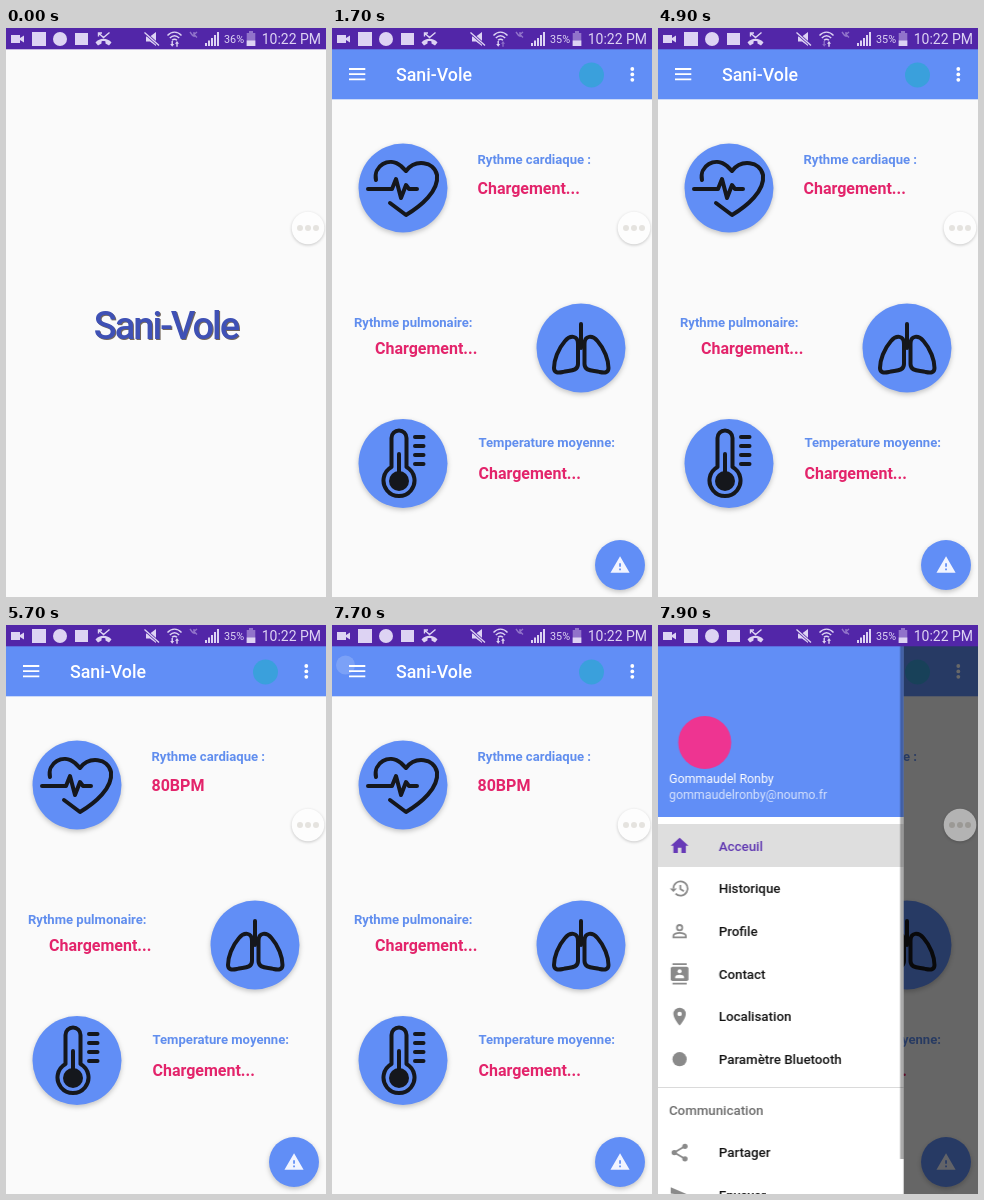
These frames come from a looping animation (320x569 px, 8000 ms). An HTML page:

```html
<!DOCTYPE html>
<html lang="fr">
<head>
<meta charset="utf-8">
<title>Sani-Vole</title>
<style>
  html, body { margin: 0; width: 100%; height: 100%; overflow: hidden; background: #fafafa; }
  svg { display: block; width: 100%; height: 100%; font-family: Roboto, sans-serif; }

  .status { fill: #ddd3f3; }
  .line { fill: none; stroke: #ddd3f3; stroke-width: 1.4; }
  .disc { fill: #618ef6; filter: drop-shadow(0 2px 2.5px rgba(0, 0, 0, .22)); }
  .ink { fill: none; stroke: #15171c; stroke-width: 4; stroke-linecap: round; stroke-linejoin: round; }
  .label { font-size: 13.1px; font-weight: 700; fill: #618eee; }
  .value { font-size: 16px; font-weight: 700; fill: #e3246b; }
  .brand { font-size: 17.8px; font-weight: 500; fill: #fff; }
  .logo { font-size: 38px; font-weight: 500; letter-spacing: -2px; fill: #3f51b5; text-anchor: middle;
          filter: drop-shadow(1px 1px .6px rgba(70, 55, 40, .75)); }
  .menu { font-size: 13.3px; font-weight: 500; fill: #111; }
  .icons { fill: #8a8a8a; }
  .outline { fill: none; stroke: #8a8a8a; stroke-width: 2; }

  .splash, .home, .old, .new, .up, .down, .wait, .bpm, .touch, .scrim, .drawer {
    animation: 8s step-end infinite;
  }
  .splash { animation-name: splash; }
  .home   { animation-name: home; }
  .old    { animation-name: old; }
  .new    { animation-name: new; }
  .up     { animation-name: up; }
  .down   { animation-name: down; }
  .wait   { animation-name: wait; }
  .bpm    { animation-name: bpm; }
  .touch  { animation-name: touch; }
  .scrim  { animation-name: scrim; }
  .drawer { animation-name: drawer; }

  @keyframes splash { 0% { opacity: 1 } 12.5%, 100% { opacity: 0 } }
  @keyframes home   { 0% { opacity: 0 } 12.5%, 100% { opacity: 1 } }
  @keyframes old    { 0% { opacity: 1 } 15%, 100% { opacity: 0 } }
  @keyframes new    { 0% { opacity: 0 } 15%, 100% { opacity: 1 } }
  @keyframes up     { 0% { opacity: 1 } 7.5% { opacity: .4 } 10% { opacity: 1 } 21.25% { opacity: .4 } 61.25%, 100% { opacity: 1 } }
  @keyframes down   { 0% { opacity: 1 } 8.75% { opacity: .4 } 12.5% { opacity: 1 } 46.25% { opacity: .4 } 63.75%, 100% { opacity: 1 } }
  @keyframes wait   { 0% { opacity: 1 } 63.75%, 100% { opacity: 0 } }
  @keyframes bpm    { 0% { opacity: 0 } 63.75%, 100% { opacity: 1 } }
  @keyframes touch  { 0% { opacity: 0 } 93.75% { opacity: .06 } 95% { opacity: .12 } 96.25% { opacity: .17 } 97.5%, 100% { opacity: 0 } }
  @keyframes scrim  { 0% { opacity: 0 } 97.5% { opacity: .535 } 98.75%, 100% { opacity: .592 } }
  @keyframes drawer { 0% { transform: translateX(-260px) } 97.5% { transform: translateX(-27.6px) } 98.75%, 100% { transform: translateX(-3.3px) } }
</style>
</head>
<body>
<svg viewBox="0 0 320 569" preserveAspectRatio="none">
  <rect width="320" height="569" fill="#fafafa"/>

  <g class="splash">
    <text class="logo" x="160" y="310.5">Sani-Vole</text>
  </g>

  <g class="home">
    <rect y="21" width="320" height="50.3" fill="#618ef6"/>
    <path d="M17 41h16.300M17 46.200h16.300M17 51.400h16.300" stroke="#fff" stroke-width="1.8"/>
    <text class="brand" x="64" y="53">Sani-Vole</text>
    <circle cx="259.5" cy="47" r="12.5" fill="#3aa0dc"/>
    <g fill="#fff">
      <circle cx="300.3" cy="41" r="1.9"/><circle cx="300.3" cy="46.4" r="1.9"/><circle cx="300.3" cy="51.8" r="1.9"/>
    </g>

    <circle class="disc" cx="71" cy="160" r="44.5"/>
    <g class="ink">
      <path d="M44 152C41 138 57 128 69 138L74 143C83 131 102 133 105 147C107 163 89 178 74 187L58 175"/>
      <path d="M36 161H60L64 151L69 170L74 157L77 161H85"/>
    </g>
    <text class="label" x="145.5" y="136">Rythme cardiaque :</text>
    <text class="value wait" x="145.5" y="166.3">Chargement...</text>
    <text class="value bpm" x="145.5" y="166.3">80BPM</text>

    <circle class="disc" cx="249" cy="320" r="44.5"/>
    <g class="ink" stroke-width="3.6">
      <path d="M249 296V320"/>
      <path id="lung" d="M246 336V316C246 307 238 307 233 313C226 321 222 332 222 340C222 345 226 345 231 344C236 342 246 344 246 336Z"/>
      <use href="#lung" transform="translate(498.500) scale(-1 1)"/>
    </g>
    <text class="label" x="22" y="299">Rythme pulmonaire:</text>
    <text class="value" x="43" y="326.3">Chargement...</text>

    <circle class="disc" cx="71" cy="435.5" r="44.5"/>
    <g class="ink">
      <path d="M59.500 439V410a7.500 7.500 0 0 1 15 0V439A15.500 15.500 0 1 1 59.500 439Z"/>
      <path d="M67 426V446M83 409H91.500M83 418H91.500M83 427H91.500M83 436H91.500"/>
    </g>
    <circle cx="67" cy="453" r="10" fill="#15171c"/>
    <text class="label" x="146.5" y="419">Temperature moyenne:</text>
    <text class="value" x="146.5" y="451">Chargement...</text>

    <circle class="disc" cx="288" cy="537" r="25"/>
    <path d="M1 21h22L12 2zm12-3h-2v-2h2zm0-4h-2v-4h2z" fill="#f1f4ff" transform="translate(277.6 526.5) scale(.87)"/>

    <circle class="touch" cx="13.5" cy="40" r="9.5" fill="#fff"/>
    <rect class="scrim" y="21" width="320" height="548"/>

    <g class="drawer">
      <rect y="21" width="248.9" height="548" fill="#fff"/>
      <rect y="21" width="248.9" height="171" fill="#618ef6"/>
      <circle cx="50" cy="117.5" r="26.5" fill="#ee3491"/>
      <g font-size="12.4" fill="#fff">
        <text x="14.2" y="157.5">Gommaudel Ronby</text>
        <text x="14.2" y="174" fill-opacity=".75">gommaudelronby@noumo.fr</text>
      </g>

      <rect y="199" width="248.9" height="43" fill="#dedede"/>
      <g class="menu">
        <text x="64" y="225.5" fill="#5e35b1">Acceuil</text>
        <text x="64" y="268.2">Historique</text>
        <text x="64" y="310.9">Profile</text>
        <text x="64" y="353.6">Contact</text>
        <text x="64" y="396.3">Localisation</text>
        <text x="64" y="439">Paramètre Bluetooth</text>
        <text x="14.2" y="489.7" fill="#6c6c6c">Communication</text>
        <text x="64" y="532.3">Partager</text>
        <text x="64" y="575">Envoyer</text>
      </g>
      <path d="M0 462.500H248.900" stroke="#dadada"/>

      <!-- icons on a 24-unit grid, one row every 48 units -->
      <g class="icons" transform="translate(14.2 210.2) scale(.889)">
        <path fill="#673ab7" d="M10 20v-6h4v6h5v-8h3L12 3 2 12h3v8z"/>
        <g transform="translate(0 48)">
          <path class="outline" d="M5 12a8 8 0 1 1 2.400 5.700M12.800 8v4.600l4 2.400"/>
          <path d="M1 12h8l-4 4z"/>
        </g>
        <g class="outline" transform="translate(0 96)">
          <circle cx="12" cy="8" r="3"/>
          <path d="M5 19v-2c0-2 4-3.100 7-3.100s7 1.100 7 3.100v2z"/>
        </g>
        <g transform="translate(0 144)">
          <path d="M4 0h16v2H4zM4 22h16v2H4z"/>
          <rect x="2" y="4" width="20" height="16" rx="2"/>
          <g fill="#fff"><circle cx="12" cy="9" r="2.3"/><path d="M7 17v-1.500c0-3.300 10-3.300 10 0V17z"/></g>
        </g>
        <g transform="translate(0 192)">
          <path d="M12 2a7 7 0 0 0-7 7c0 5.250 7 13 7 13s7-7.750 7-13a7 7 0 0 0-7-7z"/>
          <circle cx="12" cy="9" r="2.5" fill="#fff"/>
        </g>
        <circle cx="12" cy="252" r="8"/>
        <g transform="translate(0 345)">
          <path class="outline" d="M18 5L6 12l12 7"/>
          <circle cx="18" cy="5" r="3"/><circle cx="6" cy="12" r="3"/><circle cx="18" cy="19" r="3"/>
        </g>
        <path transform="translate(0 393)" d="M2 21l21-9L2 3v7l15 2-15 2z"/>
      </g>
      <rect x="245.4" y="21" width="3.5" height="513" fill-opacity=".33"/>
    </g>
  </g>

  <rect width="320" height="21.3" fill="#5226a8"/>
  <g class="status">
    <path d="M5 7h9v3l4-2.500v7L14 12v3H5z"/>
    <rect x="26" y="4" width="14" height="14"/>
    <circle cx="54" cy="11" r="7"/>
    <rect x="69" y="5" width="13" height="12"/>
    <path d="M89.500 14.500c4-5 12-5 16 0l-2.500 3-3.500-2v-2c-1.500-.6-3-.6-4 0v2l-3.500 2z"/>
    <path class="line" d="M92.500 8.500V5h3.500M92.500 5l5 4.500 6-5"/>

    <path d="M140 8.500h4l6-4.500v14l-6-4.500h-4z"/>
    <path d="M138.500 4.500l14.500 13" stroke="#5226a8" stroke-width="3"/>
    <path class="line" d="M138.500 4.500l14.500 13"/>
    <path class="line" d="M161.500 7.500c4-4.500 10-4.500 14 0M163.800 10c3-3 6.400-3 9.400 0M166 12.300c1.600-1.400 3.400-1.400 5 0"/>
    <path class="down" d="M165.500 13h1.400v3h1.300l-2 2.800-2-2.800h1.300z"/>
    <path class="up" d="M170.300 18.800h1.400v-3h1.300l-2-2.800-2 2.800h1.300z"/>
    <path class="line" d="M184 4l3 4M188 4v5M191 4l-3 2.500 3 3" opacity=".45"/>
    <path d="M199 15h2v3h-2zM202 12.500h2V18h-2zM205 10h2v8h-2zM208 7h2v11h-2zM211 4h2v14h-2z"/>
    <g font-size="10.8">
      <text class="old" x="218" y="15">36%</text>
      <text class="new" x="218" y="15">35%</text>
    </g>
    <path d="M243 3h4v2h2.300v13h-8.600V5h2.300z" fill-opacity=".45"/>
    <path d="M240.700 12.500h8.600V18h-8.600z"/>
    <text x="255.700" y="16" font-size="14">10:22 PM</text>
  </g>

  <g opacity=".5">
    <circle cx="302" cy="200" r="16.3" fill="#fff" style="filter: drop-shadow(0 1.5px 1.5px rgba(0, 0, 0, .4))"/>
    <g fill="#d0ccc4"><circle cx="294" cy="200" r="3"/><circle cx="302" cy="200" r="3"/><circle cx="310" cy="200" r="3"/></g>
  </g>
</svg>
</body>
</html>
```
